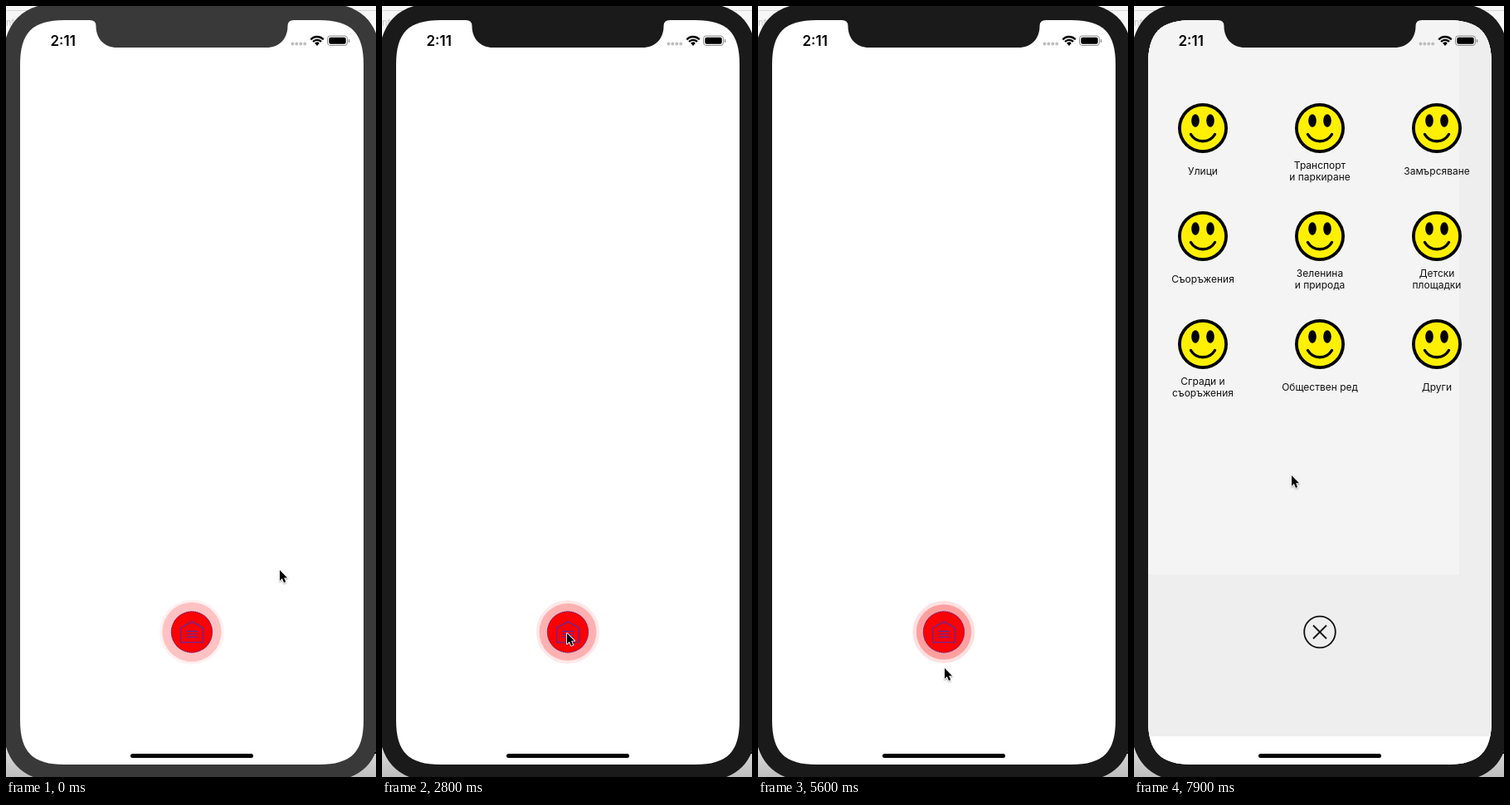
Recreate the animation shown at these times as an HTML page with a canvas. Size 446 by 928 pixels, loop 8000 ms.

```html
<!DOCTYPE html>
<html lang="bg">
<head>
<meta charset="utf-8">
<title>Menu</title>
<style>
html, body { margin: 0; width: 100%; height: 100%; overflow: hidden; background: #f6f6f6; }
canvas { display: block; width: 446px; height: 928px; }
</style>
</head>
<body>
<canvas id="stage"></canvas>
<script>
const W = 446, H = 928, LOOP = 8000, STEP = 100;
const FONT = 'Inter, "Open Sans", sans-serif';
const canvas = document.getElementById('stage');
const dpr = window.devicePixelRatio || 1;
canvas.width = W * dpr;
canvas.height = H * dpr;
const c = canvas.getContext('2d');

const BTN = { x: 224, y: 753.5 };
const LABELS = ['Улици', 'Транспорт|и паркиране', 'Замърсяване',
  'Съоръжения', 'Зеленина|и природа', 'Детски|площадки',
  'Сгради и|съоръжения', 'Обществен ред', 'Други'].map(s => s.split('|'));

// Menu sessions: items fly in at `fly`, vanish from `leave`.
const MENUS = [
  { show: 2860, fly: 3114, leave: 4950, hide: 5300 },
  { show: 6710, fly: 6970.5, leave: 1e9, hide: 1e9 }
];
const FLY = 500, STAGGER = 50, FADE = 250;
const ACTIVE_AT = 2100;

// Pointer tip: time, x, y
const PATH = [[0, 330, 679], [300, 343, 700], [1000, 306, 782], [1700, 223, 756],
  [2800, 223, 755], [3600, 229, 770], [4500, 229, 770], [4900, 223, 752],
  [5200, 223, 756], [5600, 225, 797], [6100, 224, 790], [6500, 223, 756],
  [6800, 223, 756], [7300, 220.5, 789], [7800, 190, 565], [8000, 190, 565]];

const clamp = v => Math.max(0, Math.min(1, v));
const mix = (a, b, p) => a + (b - a) * p;

// cubic-bezier(.42, 0, .58, 1)
function ease(x) {
  if (x <= 0) return 0;
  if (x >= 1) return 1;
  let lo = 0, hi = 1, u = 0.5;
  for (let i = 0; i < 24; i++) {
    u = (lo + hi) / 2;
    const v = 1 - u;
    if (1.26 * u * v * v + 1.74 * u * u * v + u * u * u < x) lo = u; else hi = u;
  }
  return u * u * (3 - 2 * u);
}

function disc(x, y, r, color) {
  c.beginPath();
  c.arc(x, y, r, 0, Math.PI * 2);
  c.fillStyle = color;
  c.fill();
}

function round(x, y, w, h, r) {
  c.beginPath();
  c.roundRect(x, y, w, h, r);
}

// Rounded box with continuous-curvature corners
function smoothBox(l, t, r, b, rad) {
  const e = rad * 1.28, k = rad * 0.355;
  c.beginPath();
  c.moveTo(l, t + e);
  c.bezierCurveTo(l, t + k, l + k, t, l + e, t);
  c.lineTo(r - e, t);
  c.bezierCurveTo(r - k, t, r, t + k, r, t + e);
  c.lineTo(r, b - e);
  c.bezierCurveTo(r, b - k, r - k, b, r - e, b);
  c.lineTo(l + e, b);
  c.bezierCurveTo(l + k, b, l, b - k, l, b - e);
  c.closePath();
}

function line(points, close) {
  c.beginPath();
  points.forEach(([x, y], i) => i ? c.lineTo(x, y) : c.moveTo(x, y));
  if (close) c.closePath();
}

function text(s, x, y, size, weight, align) {
  c.font = `${weight} ${size}px ${FONT}`;
  c.textAlign = align;
  c.textBaseline = 'alphabetic';
  c.fillText(s, x, y);
}

function backdrop(bezel) {
  c.fillStyle = '#f7f7f7';
  c.fillRect(0, 0, W, H);
  c.fillStyle = '#d8d8d8';
  c.fillRect(0, 5, W, 1);
  const g = c.createLinearGradient(0, 860, 0, H);
  g.addColorStop(0, 'rgba(190,190,190,0)');
  g.addColorStop(1, 'rgba(190,190,190,1)');
  c.fillStyle = g;
  c.fillRect(0, 860, W, H - 860);
  c.fillStyle = '#c4c4c4';
  text('nt', 0, 24, 11, 400, 'left');
  c.fillStyle = bezel;
  smoothBox(-5, -5, 453, 935, 65);
  c.fill();
  c.fillStyle = '#111';
  c.fillRect(444, 898, 2, 2);
}

function button(t) {
  for (const lag of [0, 0.27]) {
    const left = 1 - (1.73 + t / 3000 - lag) % 1;
    disc(BTN.x, BTN.y, 25 + 15 * (1 - left * left), `rgba(255,0,0,${0.6 * left ** 1.8})`);
  }
  disc(BTN.x, BTN.y, 25, '#fe0000');
  c.strokeStyle = '#2b35c0';
  c.lineWidth = 1;
  c.setLineDash([1.5, 1.2]);
  c.beginPath();
  c.arc(BTN.x, BTN.y, 24.6, 0, Math.PI * 2);
  c.stroke();
  c.setLineDash([]);
  c.strokeStyle = '#4430b8';
  c.lineWidth = 1.2;
  line([[210.5, 766], [210.5, 748.5], [224, 741], [237.5, 748.5], [237.5, 766]], true);
  c.stroke();
  for (const y of [752.5, 756, 759.5]) {
    line([[217, y], [231, y]]);
    c.stroke();
  }
}

function smiley() {
  disc(0, 0, 30, '#000');
  disc(0, 0, 26.2, '#fff000');
  c.fillStyle = '#000';
  for (const x of [-9, 9]) {
    c.beginPath();
    c.ellipse(x, -9, 4.8, 7.8, 0, 0, Math.PI * 2);
    c.fill();
  }
  c.strokeStyle = '#000';
  c.lineWidth = 3.4;
  c.lineCap = 'round';
  c.beginPath();
  c.moveTo(-14.5, 7.5);
  c.bezierCurveTo(-8, 18.5, 8, 18.5, 14.5, 7.5);
  c.stroke();
  c.lineCap = 'butt';
}

function item(i, p) {
  const x = 83 + (i % 3) * 141, y = 147 + Math.floor(i / 3) * 130;
  c.save();
  c.translate(mix(224, x, p), mix(854.5, y, p));
  c.scale(mix(0.3, 1, p), mix(0.5, 1, p));
  smiley();
  c.fillStyle = '#111';
  const rows = LABELS[i];
  rows.forEach((s, k) => text(s, 0, 56.3 + (k - (rows.length - 1) / 2) * 14, 12, 400, 'center'));
  c.restore();
}

function closeButton() {
  c.strokeStyle = '#111';
  c.lineWidth = 1.8;
  c.beginPath();
  c.arc(BTN.x, BTN.y, 18.8, 0, Math.PI * 2);
  c.stroke();
  for (const s of [-1, 1]) {
    line([[BTN.x - 8, BTN.y - 8 * s], [BTN.x + 8, BTN.y + 8 * s]]);
    c.stroke();
  }
}

function menu(t, m) {
  const alpha = Math.min(clamp((t - m.show) / FADE), 1 - clamp((t - m.hide) / FADE));
  if (alpha <= 0) return;
  c.save();
  c.globalAlpha = alpha;
  c.fillStyle = '#fff';
  c.fillRect(17, 17, 414, 896);
  c.fillStyle = '#eeeeee';
  c.fillRect(17, 17, 414, 862);
  c.fillStyle = '#f4f4f4';
  c.fillRect(17, 17, 375, 667);
  closeButton();
  c.beginPath();
  c.rect(17, 17, 414, 842);
  c.clip();
  c.globalAlpha = alpha * (1 - clamp((t - m.leave) / 300));
  for (let i = 0; i < 9; i++) {
    const q = (t - m.fly - i * STAGGER) / FLY;
    if (q > 0) item(i, ease(q));
  }
  c.restore();
}

function notch(color) {
  c.fillStyle = color;
  c.beginPath();
  c.moveTo(101, 16);
  c.lineTo(101, 17);
  c.quadraticCurveTo(108.5, 17, 108.5, 24);
  c.bezierCurveTo(108.5, 40, 119, 50, 134, 50);
  c.lineTo(314, 50);
  c.bezierCurveTo(329, 50, 339.5, 40, 339.5, 24);
  c.quadraticCurveTo(339.5, 17, 347, 17);
  c.lineTo(347, 16);
  c.fill();
}

function statusBar() {
  c.fillStyle = '#000';
  text('2:11', 53.5, 47.7, 17, 600, 'left');
  for (let i = 0; i < 4; i++) disc(345.5 + i * 4.9, 45.5, 1.9, '#bdbdbd');
  c.strokeStyle = '#000';
  c.lineWidth = 2.3;
  for (const r of [10.6, 6.8]) {
    c.beginPath();
    c.arc(375, 47.6, r, -Math.PI * 0.76, -Math.PI * 0.24);
    c.stroke();
  }
  c.fillStyle = '#000';
  c.beginPath();
  c.moveTo(375, 48);
  c.arc(375, 47.6, 4, -Math.PI * 0.76, -Math.PI * 0.24);
  c.fill();
  c.strokeStyle = '#8c8c8c';
  c.lineWidth = 1;
  round(387.5, 36, 24, 11.5, 3.4);
  c.stroke();
  c.fillStyle = '#000';
  round(389.3, 37.7, 20.4, 8.1, 2);
  c.fill();
  c.fillStyle = '#8c8c8c';
  round(412.8, 40, 1.5, 4, 1);
  c.fill();
  c.fillStyle = '#000';
  round(150, 900, 148, 5, 2.5);
  c.fill();
}

function pointer(t) {
  let i = 1;
  while (i < PATH.length - 1 && t > PATH[i][0]) i++;
  const [t0, x0, y0] = PATH[i - 1], [t1, x1, y1] = PATH[i];
  const p = ease((t - t0) / (t1 - t0));
  c.save();
  c.translate(mix(x0, x1, p), mix(y0, y1, p));
  c.scale(0.88, 0.88);
  line([[0, 0], [0, 14.5], [3.3, 11.4], [5.7, 17], [8.2, 16], [5.8, 10.5], [10.3, 10.5]], true);
  c.shadowColor = 'rgba(0,0,0,.35)';
  c.shadowBlur = 2;
  c.shadowOffsetY = 1;
  c.strokeStyle = '#fff';
  c.lineWidth = 2;
  c.lineJoin = 'round';
  c.stroke();
  c.shadowColor = 'transparent';
  c.fillStyle = '#000';
  c.fill();
  c.restore();
}

function draw(t) {
  const bezel = t >= ACTIVE_AT ? '#1a1a1a' : '#393939';
  c.setTransform(dpr, 0, 0, dpr, 0, 0);
  backdrop(bezel);
  c.save();
  smoothBox(17, 17, 431, 913, 42);
  c.clip();
  c.fillStyle = '#fff';
  c.fillRect(17, 17, 414, 896);
  button(t);
  MENUS.forEach(m => menu(t, m));
  c.restore();
  notch(bezel);
  statusBar();
  pointer(t);
}

const start = performance.now();
function tick() {
  const t = (performance.now() - start) % LOOP;
  draw(Math.floor(t / STEP) * STEP);
  requestAnimationFrame(tick);
}
tick();
</script>
</body>
</html>
```
